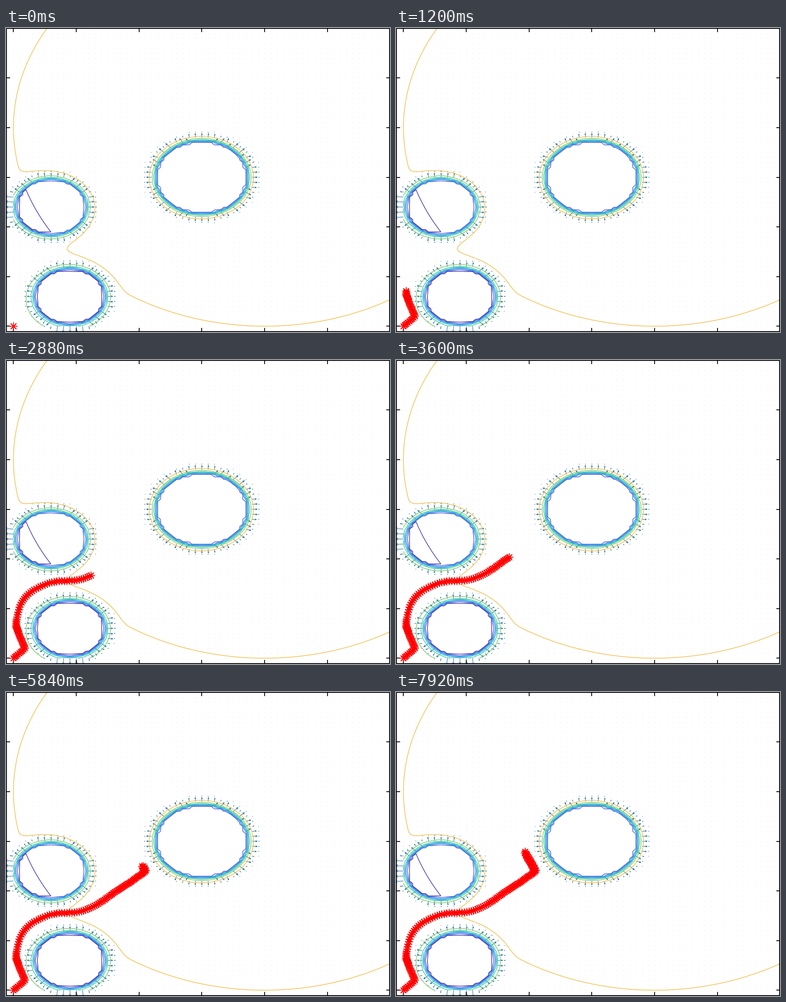
A matplotlib script for the animation above (8 s loop, 842 px wide and 665 px high).

```python
import numpy as np
import matplotlib.pyplot as plt
from matplotlib.animation import FuncAnimation
from matplotlib.collections import LineCollection

W, H, DPI = 842, 665, 100
PX = 72 / DPI                      # one pixel in points
FRAMES, INTERVAL = 100, 80

GOAL = (4.0, 4.0)
OBSTACLES = [(3.0, 3.0, 0.63), (0.6, 2.4, 0.45), (0.9, 0.6, 0.45)]
REACH, GAIN, CAP = 0.5, 0.69, 56   # repulsion range, strength, ceiling

RUN_END = 55                       # step at which the slow climb begins
CLIMB_MARKS = 29


def to_px(x, y):
    return 16.3 + 137.7 * x, 652.3 - 108.6 * y


def potential(step):
    """Pixel grid and potential sampled every `step` units."""
    axis = np.arange(round(6 / step) + 1) * step
    x, y = np.meshgrid(axis, axis)
    total = ((x - GOAL[0]) ** 2 + (y - GOAL[1]) ** 2) / 2
    for ox, oy, radius in OBSTACLES:
        gap = np.maximum(np.hypot(x - ox, y - oy) - radius, 1e-3)
        push = np.minimum(GAIN * (1 / gap - 1 / REACH) ** 2, CAP)
        total += np.where(gap < REACH, push, 0)
    return *to_px(x, y), total


fig = plt.figure(figsize=(W / DPI, H / DPI), dpi=DPI, facecolor="white")
ax = fig.add_axes([0, 0, 1, 1])
ax.set_xlim(0, W)
ax.set_ylim(H, 0)
ax.axis("off")


def draw_contours():
    x, y, field = potential(0.05)
    colors = ["#f2bd48", "#7cc966", "#3cc59a", "#1fbcc0",
              "#2aa5e0", "#3485f0", "#4659e0", "#4030aa"]
    ax.contour(x, y, field, levels=np.arange(8, 65, 8), colors=colors,
               linewidths=1.4 * PX, zorder=3)


def draw_arrows():
    step = 0.1
    x, y, field = potential(step)
    dy, dx = np.gradient(field, step)
    u, v = -dx * 0.0003 * 137.7, dy * 0.0003 * 108.6
    size = np.hypot(u, v)
    outside = field < CAP
    faint = (size < 0.7) & outside
    ax.plot(x[faint], y[faint], "s", ms=1 * PX, mew=0,
            color="#d6dce4", zorder=1)
    shown = (size >= 0.7) & outside
    segments = []
    for px, py, a, b in zip(x[shown], y[shown], u[shown], v[shown]):
        tip = (px + a, py + b)
        barbs = [(tip[0] - 0.3 * a + s * b, tip[1] - 0.3 * b - s * a)
                 for s in (0.14, -0.14)]
        segments += [[(px, py), tip], [barbs[0], tip, barbs[1]]]
    ax.add_collection(LineCollection(segments, colors="#10659f",
                                     linewidths=1.0 * PX, zorder=2))


def draw_box():
    left, right, top, bottom = 1, 841, 1, 663.5
    lines = [[(left, top), (right, top), (right, bottom),
              (left, bottom), (left, top)]]
    for k in range(6):
        x, y = to_px(k, k)
        lines += [[(x, top), (x, top + 7.5)], [(x, bottom), (x, bottom - 7.5)],
                  [(left, y), (left + 7.5, y)], [(right, y), (right - 7.5, y)]]
    ax.add_collection(LineCollection(lines, colors="black",
                                     linewidths=1.8 * PX, zorder=4))


def spline(t, knots, values):
    """Cubic Hermite curve through a few timed key points."""
    slope = np.gradient(values, knots)
    i = np.clip(np.searchsorted(knots, t, "right") - 1, 0, len(knots) - 2)
    h = knots[i + 1] - knots[i]
    s = (t - knots[i]) / h
    return (values[i] * (1 + 2 * s) * (1 - s) ** 2
            + values[i + 1] * s * s * (3 - 2 * s)
            + h * s * (1 - s) * (slope[i] * (1 - s) - slope[i + 1] * s))


def build_run():
    """Straight start, then a curve between the obstacles."""
    start, turn = np.array([16, 652]), np.array([41, 630])
    first = start + (turn - start) * np.arange(0, 1, 1 / 8)[:, None]
    keys = np.array([(4, *turn), (11, 25.5, 592), (15, 22, 575),
                     (20, 36, 526), (27, 95, 487), (33, 160, 480),
                     (45, 248, 431), (RUN_END, 304, 393)], float)
    t = np.arange(4, RUN_END + 0.5, 0.5)
    curve = np.column_stack([spline(t, keys[:, 0], keys[:, k])
                             for k in (1, 2)])
    return np.vstack([first, curve])


def build_climb():
    """Slow zigzag away from the obstacle."""
    j = np.arange(CLIMB_MARKS)
    s = (j / j[-1]) ** 1.2
    sway = 1.5 * (-1.0) ** j
    return np.column_stack([305 - 23 * s + 0.87 * sway,
                            391 - 41 * s - 0.49 * sway])


draw_contours()
draw_arrows()
draw_box()
run = build_run()
trail = np.vstack([run, build_climb()])
marks, = ax.plot([], [], linestyle="none", marker=(8, 2, 0), ms=17.5 * PX,
                 mew=1.4 * PX, color="red", zorder=5)


def update(frame):
    late = max(0, frame - RUN_END) / (FRAMES - 1 - RUN_END)
    count = min(1 + 2 * frame, len(run)) + int(CLIMB_MARKS * late ** 1.19)
    marks.set_data(trail[:count, 0], trail[:count, 1])
    return marks,


anim = FuncAnimation(fig, update, frames=FRAMES, interval=INTERVAL,
                     repeat=True, repeat_delay=0)
plt.show()
```
